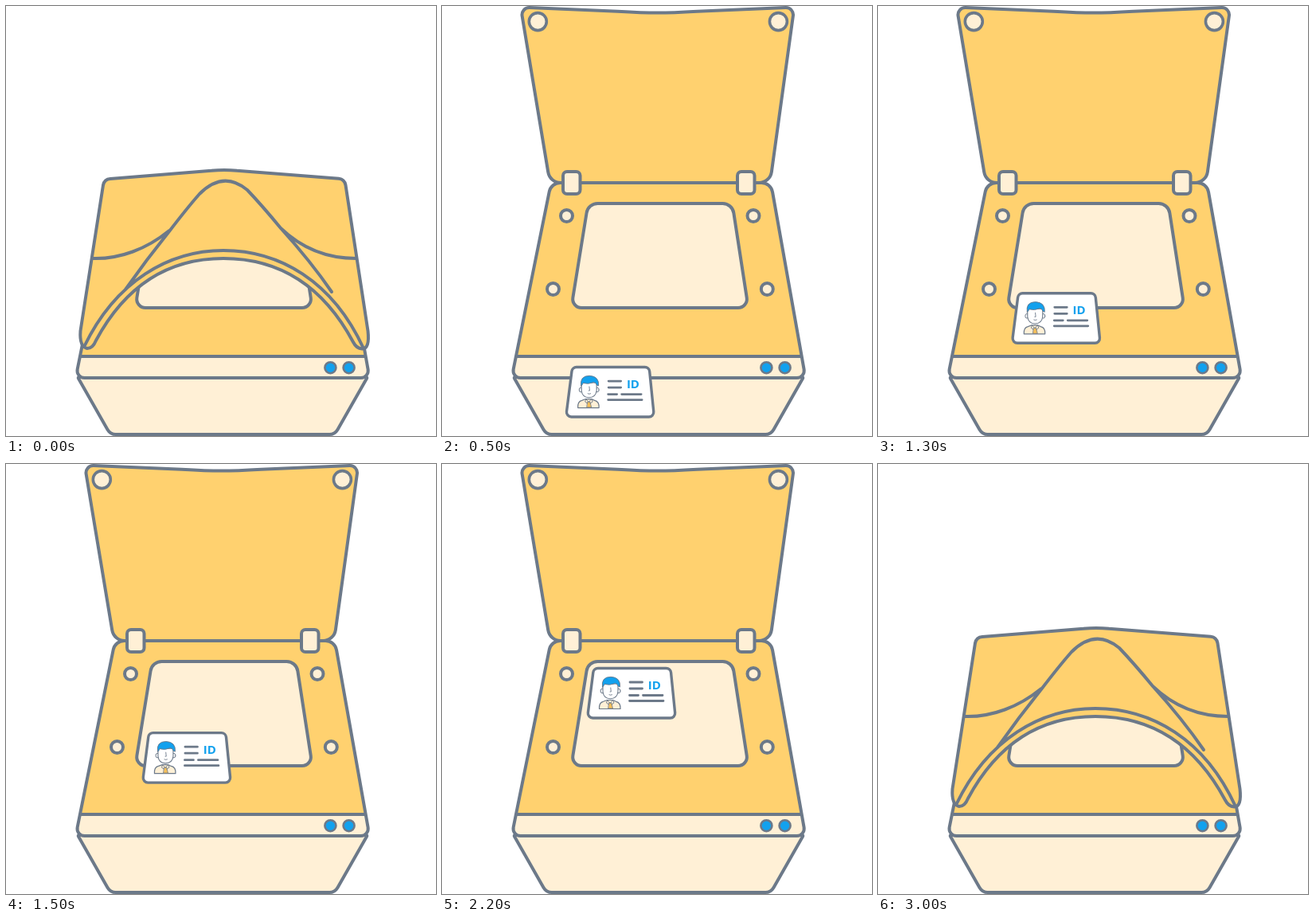
Animation, 540 px wide and 540 px high, one loop 4000 ms. Source, as an HTML page with a canvas:

```html
<!DOCTYPE html>
<html lang="en">
<head>
<meta charset="utf-8">
<title>Scanner</title>
<style>
  html, body { margin: 0; width: 100%; height: 100%; overflow: hidden; background: #fff; }
  canvas { display: block; width: 100vw; height: 100vh; }
</style>
</head>
<body>
<canvas id="stage" width="540" height="540"></canvas>
<script>
const ctx = document.getElementById('stage').getContext('2d');
const LINE = '#6c7989', YELLOW = '#ffd16f', CREAM = '#fff0d6', BLUE = '#12a1ee', WHITE = '#fff';
const LOOP = 4000, STEP = 100;

function paint(path, fill, width = 4, stroke = LINE) {
  if (fill) { ctx.fillStyle = fill; ctx.fill(path); }
  if (width) { ctx.strokeStyle = stroke; ctx.lineWidth = width; ctx.stroke(path); }
}

// Polygon with a radius at each corner: [x, y, r]
function roundPoly(...pts) {
  const p = new Path2D(), n = pts.length, last = pts[n - 1];
  p.moveTo((last[0] + pts[0][0]) / 2, (last[1] + pts[0][1]) / 2);
  pts.forEach(([x, y, r], i) => {
    const next = pts[(i + 1) % n];
    p.arcTo(x, y, next[0], next[1], r);
  });
  p.closePath();
  return p;
}

function oval(x, y, rx, ry, fill, width) {
  const p = new Path2D();
  p.ellipse(x, y, rx, ry, 0, 0, Math.PI * 2);
  paint(p, fill, width);
}

const lower = roundPoly([90, 466, 1], [131, 538, 12], [413, 538, 12], [454, 466, 1]);
const base = roundPoly([137, 222, 14], [87.5, 467, 9], [456.5, 467, 9], [413, 222, 14]);
const glass = roundPoly([183.5, 248, 14], [162.3, 379, 11], [384.7, 379, 11], [364.5, 248, 14]);

function drawBase() {
  paint(lower, CREAM);
  ctx.save();
  ctx.clip(base);
  ctx.fillStyle = YELLOW;
  ctx.fillRect(80, 215, 390, 225);
  ctx.fillStyle = CREAM;
  ctx.fillRect(80, 440, 390, 35);
  paint(new Path2D('M88 440H456'));
  ctx.restore();
  paint(base);
  paint(glass, CREAM);
  for (const [x, y] of [[156.5, 263.5], [391, 263.5], [139.5, 355.5], [408.3, 355.5]]) oval(x, y, 7.5, 7.5, CREAM, 4);
  for (const x of [407.4, 430.6]) oval(x, 454.2, 7, 7, BLUE, 2.6);
}

// Lid seen from inside, from upright to nearly level
const raised = [
  { l: 98.8, r: 442.4, y: 1.6, sag: 7, rt: 9, bl: 135.5, br: 412, by: 222, bow: 0, rb: 16,
    kx: 22, ky: 18, rx: 11, ry: 11, hx: 152, hy: 208, hh: 28 },
  { l: 48, r: 500, y: 72, sag: 7.5, rt: 9, bl: 133, br: 415, by: 220, bow: 3, rb: 33,
    kx: 32, ky: 16.5, rx: 13, ry: 9, hx: 153, hy: 213, hh: 21 },
  { l: 38, r: 510, y: 170, sag: 4, rt: 5, bl: 122, br: 426, by: 219, bow: 3, rb: 30,
    kx: 44, ky: 13, rx: 13, ry: 5, hx: 153, hy: 215, hh: 18 }
];

function drawRaised(d) {
  const mid = (d.l + d.r) / 2, p = new Path2D();
  p.moveTo(mid, d.y + d.sag);
  p.quadraticCurveTo(mid - 18, d.y + d.sag, mid - 50, d.y + d.sag * .72);
  p.arcTo(d.l, d.y, d.bl, d.by, d.rt);
  p.arcTo(d.bl, d.by, mid, d.by, d.rb);
  p.quadraticCurveTo(mid, d.by + d.bow * 2, d.br - d.rb * .6, d.by);
  p.arcTo(d.br, d.by, d.r, d.y, d.rb);
  p.arcTo(d.r, d.y, mid + 50, d.y + d.sag * .72, d.rt);
  p.lineTo(mid + 50, d.y + d.sag * .72);
  p.quadraticCurveTo(mid + 18, d.y + d.sag, mid, d.y + d.sag);
  p.closePath();
  paint(p, YELLOW);
  oval(d.l + d.kx - .5, d.y + d.ky, d.rx, d.ry, CREAM, 3.6);
  oval(d.r - d.kx + 2 - (d.l < 60 ? 4.5 : 0), d.y + d.ky, d.rx, d.ry, CREAM, 3.6);
  for (const x of [d.hx, d.hx + 219]) {
    paint(roundPoly([x + 21.5, d.hy, 5], [x, d.hy, 5], [x, d.hy + d.hh, 5], [x + 21.5, d.hy + d.hh, 5]), CREAM);
  }
}

// Lid seen from outside
const shell = new Path2D(`M131 217 L258 206.8 Q274 205 290 206.8 L418 216.8 Q425 217.5 426.5 225
  L454.5 408 Q457 431 447 430.5 Q440 430 436 422 C400 355 346 317 273 317
  C200 317 148 355 113 420 Q109 430 102 430 Q92 428 93.5 408 L122 225 Q123.5 217.5 131 217Z`);
const folds = new Path2D(`M98 428 C138 345 205 307 273 307 C343 307 410 345 449 430
  M150 356 Q176 319 205 283 Q228 253 243 236 Q273 206 303 231 Q322 251 345 279 Q383 321 409 359
  M109 317 C143 318 177 305 205 282 M345 279 C372 305 404 317 440 317`);

function drawLowered(sx, sy) {
  const m = new DOMMatrix([sx, 0, 0, sy, 274 * (1 - sx), 210 * (1 - sy)]);
  const place = path => { const p = new Path2D(); p.addPath(path, m); return p; };
  paint(place(shell), YELLOW);
  paint(place(folds));
}

const cardShape = roundPoly([8, .5, 6], [0, 63, 6], [110.8, 63, 6], [104.5, .5, 6]);
const shoulders = new Path2D('M15 51.5 Q14.5 43.5 20 42.3 L25 40.5 H32 L36 42.3 Q42 43.5 41.5 51.5Z');
const face = new Path2D('M19.5 20 V30 Q20.5 38.5 28.8 38.7 Q37.5 38.5 38.5 30 V20Z');
const hair = new Path2D('M19 24 Q17 11.5 29.5 11.3 Q42 12 41 24 L38.7 23 Q38 20 35 19.5 Q28 22.5 21.5 20.5 Q21 23 19 24Z');
const tie = new Path2D('M27.3 44 H30.3 L32 51 H26.5Z');
const collar = new Path2D('M25 40.5 L28.8 44.5 L32 40.5 M25 41 L24 44 L27 46 M32.5 41 L33.5 44 L30.5 46');
const features = new Path2D('M29.3 25 L29.8 30 H28.6 M27.5 33.8 Q29 34.8 31 33.8');
const rules = new Path2D('M53.5 18H69 M53.5 26H69 M53 34.5H64 M70 34.5H94.5 M53 41.5H95.5');

function drawCard(x, y) {
  ctx.save();
  ctx.translate(x, y);
  paint(cardShape, WHITE, 3.4);
  paint(shoulders, CREAM, 1.2);
  paint(tie, '#f6bf59', .8);
  paint(collar, null, .9);
  oval(18.6, 29, 2, 2.8, WHITE, 1);
  oval(39.5, 29, 2, 2.8, WHITE, 1);
  paint(face, WHITE, 1.1);
  paint(hair, BLUE, .9);
  paint(features, null, .9);
  paint(rules, null, 2.8);
  ctx.fillStyle = BLUE;
  ctx.font = 'bold 15px "Open Sans", sans-serif';
  ctx.textAlign = 'center';
  ctx.fillText('ID', 84.3, 27);
  ctx.restore();
}

function draw(ms) {
  const k = Math.floor((ms % LOOP) / STEP);
  const lid = Math.min(4, Math.max(0, 4 - k, k - 26));
  ctx.fillStyle = WHITE;
  ctx.fillRect(0, 0, 540, 540);
  ctx.lineCap = ctx.lineJoin = 'round';
  drawBase();
  if (lid < 3) drawRaised(raised[lid]);
  if (k >= 5 && k < 30) {
    const left = 17 - Math.min(17, k - 5);
    drawCard(182.5 - left * 1.58, 256 + left * 11.59);
  }
  if (lid === 3) drawLowered(1.05, .55);
  if (lid === 4) drawLowered(1, 1);
}

const start = performance.now();
function tick() {
  draw(performance.now() - start);
  requestAnimationFrame(tick);
}
tick();
</script>
</body>
</html>
```
